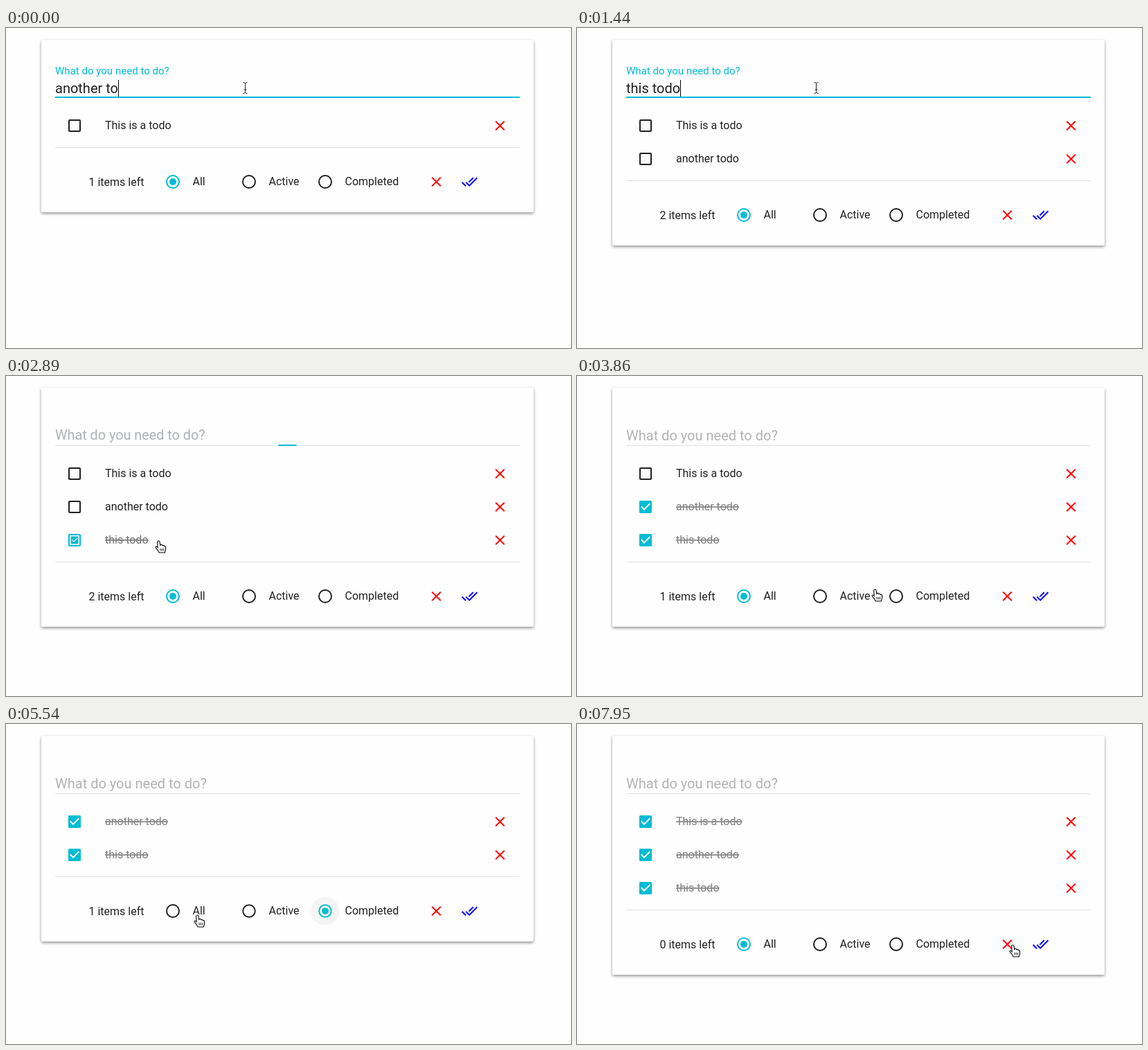
Write an HTML page that moves like this. It is 816x462 px and loops after 8 s.

```html
<!DOCTYPE html>
<html lang="en">
<head>
<meta charset="utf-8">
<title>Todo list</title>
<style>
html, body { margin: 0; width: 100%; height: 100%; overflow: hidden; background: #fefefe; }
#card {
  position: absolute; left: 51px; top: 17px; width: 711px; border-radius: 2px; background: #fefefe;
  box-shadow: 0 2px 4px rgba(0,0,0,.42);
}
svg { position: absolute; left: 0; top: 0; }
text { font: 16px Roboto, sans-serif; fill: #212121; white-space: pre; }
.big { font-size: 20px; }
</style>
</head>
<body>
<div id="card"></div>
<svg id="stage" width="816" height="462"></svg>
<script>
const LOOP = 8000, BLUR = 2674, KEY = 120, BLINK = 530;
const CYAN = '#00bcd4', DARK = '#212121', PALE = '#e0e0e0';

// typed one letter per KEY from start, added to the list at enter
const phrases = [
  { text: 'another todo', start: -1150, enter: 410 },
  { text: 'this todo', start: 480, enter: 1970 }
];

const todos = [
  { name: 'This is a todo', born: -1, done: 7060 },
  { name: 'another todo', born: 410, done: 3310 },
  { name: 'this todo', born: 1970, done: 2758 }
];

const filters = ['All', 'Active', 'Completed'];
const clicks = [
  { down: -9000, up: -9000, filter: 0 },
  { down: 4150, up: 4230, filter: 1 },
  { down: 5230, up: 5300, filter: 2 },
  { down: 6170, up: 6250, filter: 0 }
];

// pointer moves: [start, end, x, y]
const moves = [
  [0, 1, 345, 86],
  [2080, 2620, 221, 238],
  [2900, 3200, 215, 193],
  [3390, 3860, 431, 308],
  [4250, 4830, 518, 247],
  [4830, 5050, 527, 230],
  [5310, 5600, 247, 281],
  [5820, 5930, 243, 277],
  [6255, 6430, 514, 294],
  [6430, 6930, 674, 319],
  [7190, 7800, 637, 319],
  [7870, 7950, 630, 319]
];

const icons = {
  check: 'M19 3H5c-1.11 0-2 .9-2 2v14c0 1.1.89 2 2 2h14c1.11 0 2-.9 2-2V5c0-1.1-.89-2-2-2zm-9 14l-5-5 1.41-1.41L10 14.17l7.59-7.59L19 8l-9 9z',
  close: 'M19 6.41L17.59 5 12 10.59 6.41 5 5 6.41 10.59 12 5 17.59 6.41 19 12 13.41 17.59 19 19 17.59 13.41 12z',
  doneAll: 'M18 7l-1.41-1.41-6.34 6.34 1.41 1.41L18 7zm4.24-1.41L11.66 16.17 7.48 12l-1.41 1.41L11.66 19l12-12-1.42-1.41zM.41 13.41L6 19l1.41-1.41L1.83 12 .41 13.41z'
};

const pointers = {
  beam: '<path d="M-3-8Q0-8 0-6V6Q0 8-3 8M3-8Q0-8 0-6M0 6Q0 8 3 8M-2 2.5H2" transform="translate(.5 .5)" fill="none" stroke="#222"/>',
  arrow: '<path d="M0 0V12.5L2.9 9.8 5.1 14.9 7.2 14 5.1 9H9Z" stroke="#fff" stroke-width="1.6" paint-order="stroke"/>',
  hand: '<path d="M-1.8 9.5L-2.4 1.8C-2.5-.5.7-.5 1 1.5L1.8 6.3Q3.5 4 4.8 6.8 6.6 5.6 7.5 7.8 9.6 7.2 9.6 9.4V12Q9.4 14 8.3 17H.2Q-1 14-4.7 9.8C-5.5 8.2-3.4 7.3-1.8 9.5Z" fill="#fff" stroke="#000" stroke-width="1.1"/><path d="M2 11v3.5M4.3 11v3.5M6.6 11v3.5" stroke="#000" stroke-width=".9"/>'
};

const pen = document.createElement('canvas').getContext('2d');
const clamp = v => Math.max(0, Math.min(1, v));

// cubic-bezier(.23, 1, .32, 1)
function ease(elapsed, duration) {
  const x = clamp(elapsed / duration);
  let lo = 0, hi = 1;
  for (let i = 0; i < 24; i++) {
    const s = (lo + hi) / 2, r = 1 - s;
    if (.69 * s * r * r + .96 * s * s * r + s * s * s < x) lo = s; else hi = s;
  }
  return 1 - (1 - lo) ** 3;
}

const mix = (a, b, k) => `rgb(${a.map((v, i) => Math.round(v + (b[i] - v) * k))})`;
const text = (x, y, s, attrs = '') => `<text x="${x}" y="${y}" ${attrs}>${s}</text>`;
const rect = (x, y, w, h, fill) => `<rect x="${x}" y="${y}" width="${w}" height="${h}" fill="${fill}"/>`;
const at = (x, y, scale, body, opacity = 1) =>
  `<g transform="translate(${x} ${y}) scale(${scale})" opacity="${opacity}">${body}</g>`;
const icon = (name, x, y, fill, scale = 1) =>
  at(x, y, scale, `<path d="${icons[name]}" fill="${fill}" transform="translate(-12 -12)"/>`);
const ring = color => `<circle r="9" fill="none" stroke="${color}" stroke-width="2"/>`;

function typed(t) {
  const p = phrases.filter(p => p.start <= t).pop();
  if (t >= p.enter) return { value: '', since: p.enter };
  const n = Math.min(p.text.length, Math.floor((t - p.start) / KEY) + 1);
  return { value: p.text.slice(0, n), since: p.start + (n - 1) * KEY };
}

function field(t) {
  const k = ease(t - BLUR, 450), { value, since } = typed(t);
  const ink = mix([0, 188, 212], [179, 179, 179], k);
  let out = rect(71, 100, 671, 1, PALE)
    + rect(406.5 - 335.5 * (1 - k), 99, 671 * (1 - k), 2, CYAN)
    + at(71, 67 + 26 * k, .753 + .247 * k, text(0, 0, 'What do you need to do?', `class="big" style="fill:${ink}"`))
    + text(71, 94, value, 'class="big"');
  if (t < BLUR && (t - since) % (2 * BLINK) < BLINK) {
    pen.font = '20px Roboto, sans-serif';
    out += rect(Math.round(71 + pen.measureText(value).width), 75, 1, 24, '#000');
  }
  return out;
}

function row(todo, i, t) {
  const y = 141 + 48 * i, age = t - todo.done, done = age >= 0;
  const ink = mix([33, 33, 33], [128, 128, 128], ease(age, 450));
  return `<rect x="91" y="${y - 8}" width="16" height="16" rx="1" fill="none" stroke="${done ? CYAN : DARK}" stroke-width="2"/>`
    + icon('check', 99, y, CYAN, ease(age, 800))
    + text(143, y + 5, todo.name, `style="fill:${ink}${done ? ';text-decoration:line-through' : ''}"`)
    + icon('close', 713.5, y, 'red');
}

function radio(i, y, t) {
  const x = 241 + 110 * i;
  let on = 0, out = '';
  for (const { down, up, filter } of clicks) {
    const k = ease(t - up, 450);
    on += ((filter === i) - on) * k;
    if (filter === i && t >= down)
      out += `<circle cx="${x}" cy="${y}" r="${24 * ease(t - down, 1000)}" opacity="${.16 * (1 - ease(t - up, 1000))}"/>`;
  }
  return out + at(x, y, 1 - on, ring(DARK), 1 - on)
    + at(x, y, on, ring(CYAN) + `<circle r="5" fill="${CYAN}"/>`)
    + text(x + 28.5, y + 5, filters[i]);
}

function pointer(t, rows, footY) {
  let x = 0, y = 0;
  for (const [start, end, toX, toY] of moves) {
    const u = start ? clamp((t - start) / (end - start)) : 1, k = u * u * (3 - 2 * u);
    x += (toX - x) * k;
    y += (toY - y) * k;
  }
  const inRows = y > 117 && y < 117 + 48 * rows;
  const inFilters = Math.abs(y - footY) < 13 && x > 229 && x < 571;
  const inButtons = Math.abs(y - footY) < 24 && x > 597 && x < 694;
  const kind = y > 66 && y < 102 ? 'beam' : inRows || inFilters || inButtons ? 'hand' : 'arrow';
  return at(Math.round(x), Math.round(y), 1, pointers[kind]);
}

function draw(t) {
  const { filter } = clicks.filter(c => c.up <= t).pop();
  const born = todos.filter(d => d.born <= t), active = born.filter(d => d.done > t);
  const shown = [born, active, born.filter(d => d.done <= t)][filter];
  const n = shown.length, y = 174 + 48 * n;
  card.style.height = 201 + 48 * n + 'px';
  stage.innerHTML = field(t)
    + shown.map((d, i) => row(d, i, t)).join('')
    + rect(71, y - 50, 671, 1, PALE)
    + text(119.5, y + 6, active.length + ' items left')
    + filters.map((_, i) => radio(i, y, t)).join('')
    + icon('close', 621.5, y, 'red')
    + icon('doneAll', 669.5, y, 'blue')
    + pointer(t, n, y);
}

const card = document.getElementById('card'), stage = document.getElementById('stage');
const start = performance.now();
function tick() {
  draw((performance.now() - start) % LOOP);
  requestAnimationFrame(tick);
}
tick();
</script>
</body>
</html>
```
